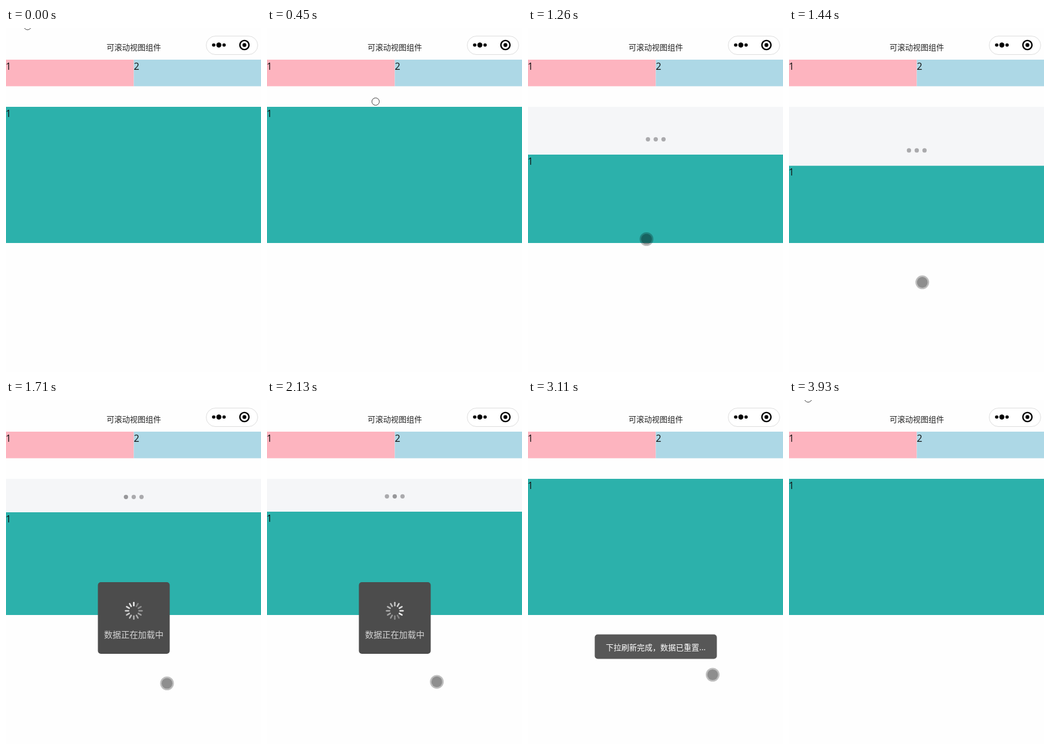
Animation, 426 px wide and 576 px high, one loop 4300 ms. Source, as an HTML page:

```html
<!DOCTYPE html>
<html lang="zh-CN">
<head>
<meta charset="utf-8">
<title>可滚动视图组件</title>
<style>
  html, body { margin: 0; width: 100%; height: 100%; overflow: hidden; background: #fefefe; }
  svg { display: block; width: 426px; height: 576px; }
  text { font-family: "Noto Sans CJK SC", "Noto Sans CJK", sans-serif; }
  .num { font: 16px "Open Sans", "Noto Sans", sans-serif; fill: #111; }
  .mid { text-anchor: middle; }
</style>
</head>
<body>
<svg viewBox="0 0 426 576">
  <defs><clipPath id="view"><rect y="132" width="426" height="228"/></clipPath></defs>

  <text class="mid" x="213.5" y="37" font-size="13" fill="#222">可滚动视图组件</text>
  <rect x="334.5" y="13.5" width="86" height="31" rx="15.5" fill="#fff" stroke="#dedede"/>
  <circle cx="347" cy="28.5" r="2.8"/>
  <circle cx="355.6" cy="28.5" r="4.2"/>
  <circle cx="364.3" cy="28.5" r="2.8"/>
  <circle cx="398.3" cy="28.5" r="7.6" fill="none" stroke="#000" stroke-width="2.4"/>
  <circle cx="398.3" cy="28.5" r="3.2"/>

  <rect y="53" width="213.5" height="44.5" fill="#fdb4bf"/>
  <rect x="213.5" y="53" width="212.5" height="44.5" fill="#add8e6"/>
  <text class="num" x="-.5" y="69.5">1</text>
  <text class="num" x="213.5" y="69.5">2</text>

  <g clip-path="url(#view)">
    <rect y="132" width="426" height="228" fill="#f5f6f8"/>
    <g id="panel">
      <rect y="132" width="426" height="228" fill="#2cb1ab"/>
      <text class="num" x="-.5" y="148.5">1</text>
      <g id="dots" fill="#97979a">
        <circle cx="200.4" cy="106.3" r="3.6"/>
        <circle cx="213.4" cy="106.3" r="3.6"/>
        <circle cx="226.4" cy="106.3" r="3.6"/>
      </g>
    </g>
  </g>

  <g id="loading">
    <rect x="153.5" y="305" width="120" height="120" rx="5" fill="#4c4c4c"/>
    <g id="spinner" transform="translate(213.5 353)" stroke="#fff" stroke-width="2.5" stroke-linecap="round"></g>
    <text class="mid" x="213.5" y="398" font-size="14.2" fill="#d4d4d4">数据正在加载中</text>
  </g>
  <g id="toast">
    <rect x="111.5" y="392.5" width="204" height="41" rx="5" fill="#575757"/>
    <text class="mid" x="213.5" y="418.6" font-size="13" fill="#fff">下拉刷新完成，数据已重置...</text>
  </g>

  <g id="cursor">
    <circle id="hover" r="6.2" fill="none" stroke="#444"/>
    <g id="press">
      <circle r="10.3" fill="none" stroke="#000" stroke-width="2.4" stroke-opacity=".25"/>
      <circle r="9.1" fill-opacity=".44"/>
    </g>
  </g>
</svg>
<script>
  const LOOP = 4300;
  const $ = id => document.getElementById(id);
  const run = (from, step, n) => Array.from({ length: n }, (_, i) => from + i * step);

  const ticks = [...run(0, 90, 21), ...run(1960, 88, 6), 2490, 2570,
    ...run(3110, 90, 3), ...run(3590, 170, 3)];

  // [time, x, y]
  const path = [
    [0, 36, -3.2], [540, 210.5, 148.5], [630, 210.5, 148.5], [720, 206, 158],
    [900, 205, 188.5], [1170, 200, 308], [1260, 198, 353.5], [1530, 235, 462],
    [1620, 260, 473], [1710, 269, 474.5], [1800, 267, 475], [2400, 307.5, 467.5],
    [2570, 307.5, 467.5], [3110, 308.5, 460], [3200, 110, 26], [3290, 40, -20],
    [3590, 28, -3.5], [3760, 32, -2.6]
  ];
  // [time, pull distance]
  const pull = [
    [630, 0], [720, 4], [900, 19], [1170, 67], [1260, 80], [1530, 108],
    [1620, 80], [1710, 56], [1960, 55], [2400, 55], [2490, 18], [2570, 0]
  ];

  function at(keys, t, col) {
    if (t <= keys[0][0]) return keys[0][col];
    const i = keys.findIndex(k => k[0] > t);
    if (i < 0) return keys[keys.length - 1][col];
    const a = keys[i - 1], b = keys[i];
    return a[col] + (b[col] - a[col]) * (t - a[0]) / (b[0] - a[0]);
  }

  const bars = Array.from({ length: 12 }, (_, i) => {
    const bar = document.createElementNS("http://www.w3.org/2000/svg", "line");
    bar.setAttribute("y1", -8.8);
    bar.setAttribute("y2", -13.8);
    bar.setAttribute("transform", `rotate(${i * 30})`);
    return $("spinner").appendChild(bar);
  });
  const dots = [...$("dots").children];

  const show = (id, on) => $(id).setAttribute("visibility", on ? "visible" : "hidden");
  const move = (id, x, y) => $(id).setAttribute("transform", `translate(${x} ${y})`);

  function draw(now) {
    const time = now % LOOP;
    const t = ticks.filter(k => k <= time).pop();
    const pressed = t >= 720 && t < 3200;

    move("cursor", at(path, t, 1), at(path, t, 2));
    move("panel", 0, at(pull, t, 1));
    show("hover", !pressed);
    show("press", pressed);
    show("loading", t >= 1620 && t < 2310);
    show("toast", t >= 2310 && t < 3930);

    const head = Math.round((t - 1710) / 83);
    bars.forEach((bar, i) => {
      const age = ((head - i) % 12 + 12) % 12;
      bar.setAttribute("opacity", 0.92 - age * 0.055);
    });
    const lit = Math.floor(((t - 1710) / 300 % 3 + 3) % 3);
    dots.forEach((dot, i) => dot.setAttribute("opacity", t >= 1620 && i === lit ? 1 : 0.8));
  }

  function loop() {
    draw(performance.now());
    requestAnimationFrame(loop);
  }
  loop();
</script>
</body>
</html>
```
